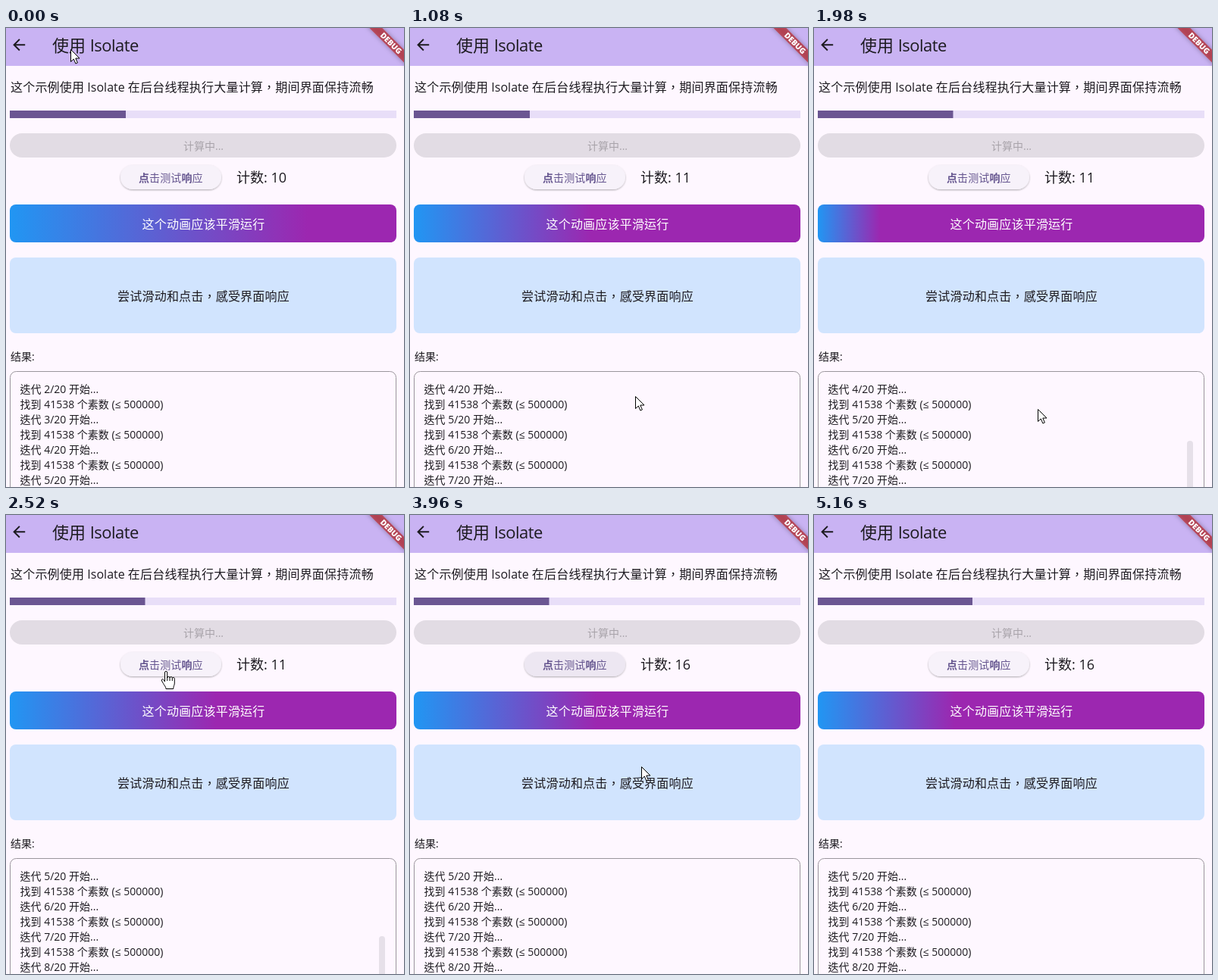
Write an HTML page that moves like this. It is 525 px wide and 606 px high and loops after 5280 ms.

```html
<!DOCTYPE html>
<html lang="zh-Hant">
<head>
<meta charset="utf-8">
<style>
  html, body { margin: 0; width: 100%; height: 100%; overflow: hidden; background: #fef7ff; }
  svg { display: block; width: 525px; height: 606px; }
  text { font: 14px 'Open Sans', 'Noto Sans CJK TC', 'Noto Sans CJK SC', sans-serif; fill: #1d1b20; white-space: pre; }
  .mid { text-anchor: middle; }
  .body { font-size: 16px; letter-spacing: .2px; }
  .plain { letter-spacing: 0; }
  .bold { font-weight: 700; }
</style>
</head>
<body>
<svg viewBox="0 0 525 606">
  <defs>
    <linearGradient id="sweep" gradientUnits="userSpaceOnUse" x1="5" x2="400" y1="0" y2="0">
      <stop stop-color="#2196f3"/>
      <stop offset="1" stop-color="#9c27b0"/>
    </linearGradient>
    <filter id="lift" x="-10%" y="-20%" width="120%" height="150%">
      <feDropShadow dx="0" dy="1" stdDeviation="0.8" flood-color="#000" flood-opacity=".32"/>
    </filter>
    <filter id="glow" x="-20%" y="-80%" width="140%" height="260%">
      <feDropShadow dx="0" dy="0" stdDeviation="3" flood-color="#000" flood-opacity=".5"/>
    </filter>
  </defs>

  <rect width="525" height="606" fill="#fef7ff"/>
  <rect width="525" height="50" fill="#c9b3f3"/>
  <path transform="translate(5.2 10.2)" fill="#1d1b20" d="M20 11H7.83l5.59-5.59L12 4l-8 8 8 8 1.41-1.41L7.83 13H20z"/>
  <text x="61" y="31" style="font-size:22px">使用 <tspan style="letter-spacing:-.55px">Isolate</tspan></text>

  <text class="body" x="6" y="84">这个示例使用<tspan class="plain"> Isolate </tspan>在后台线程执行大量计算，期间界面保持流畅</text>

  <rect x="5" y="109" width="510" height="10" fill="#e8def8"/>
  <rect id="progress" x="5" y="109" height="10" fill="#6b5692"/>

  <rect x="5" y="139" width="510" height="32" rx="16" fill="#e2dce4"/>
  <text class="mid" x="260.5" y="160.500" style="fill:#a8a3aa">计算中...</text>

  <rect id="button" x="151" y="181" width="133" height="32" rx="16" filter="url(#lift)"/>
  <text x="175" y="202.500" style="fill:#65558f;letter-spacing:.1px"><tspan class="bold">点</tspan>击测试<tspan class="bold">响</tspan>应</text>
  <text id="count" x="304" y="204" style="font-size:18px"></text>

  <rect x="5" y="233" width="510" height="50" rx="8" fill="url(#sweep)"/>
  <text class="body mid" x="260.5" y="265" style="fill:#fff">这个动画应该平滑运行</text>

  <rect x="5" y="303" width="510" height="100" rx="8" fill="#d1e4fe"/>
  <text class="body mid" x="260.5" y="360">尝试滑动和点击，感受界面响应</text>

  <text x="6" y="438.500">结果:</text>
  <rect x="5.500" y="453.500" width="509" height="200" rx="8" fill="none" stroke="#9a959c"/>
  <g id="log"></g>
  <rect id="scrollbar" x="492" width="8" height="100" rx="4" fill="#e6e0e9"/>

  <g transform="translate(532 -4) rotate(45)">
    <rect x="-40" y="28" width="80" height="12" fill="#b71c1c" fill-opacity=".63" filter="url(#glow)"/>
    <text class="mid" y="37.700" style="font-size:10.2px;font-weight:800;fill:#fff">DEBUG</text>
  </g>

  <g id="cursor" fill="#fff" stroke="#000" stroke-linejoin="round">
    <path id="arrow" d="M.5.5V16.500L4.300 13l2.600 6 2.500-1.100L6.800 12H12z"/>
    <path id="hand" d="M-1.500 14V2a1.600 1.600 0 013.200 0V9a1.600 1.600 0 013.300 0a1.600 1.600 0 013.300.7a1.500 1.500 0 013 .8V16c0 3-1.600 4-1.600 7.500H0c0-3-2-4-3.500-7L-5.500 13c-1-2 1-3 2.300-1.600zM1.700 8v5M5 9v4M8.300 10v3"/>
  </g>
</svg>
<script>
const LOOP = 5280, STEP = 60;
const el = id => document.getElementById(id);
const clamp = (v, lo = 0, hi = 1) => Math.min(hi, Math.max(lo, v));
const ramp = (t, from, to) => clamp((t - from) / (to - from));

// Pointer path: time, x, y
const path = [
  [0, 85, 28], [420, 265, 211], [600, 265, 211], [1020, 297, 486], [1140, 297, 486],
  [1560, 295, 503], [2220, 295, 503], [2520, 211, 206], [2700, 222, 173], [2760, 222, 173],
  [2880, 213, 188], [3480, 213, 188], [3960, 305, 332], [4020, 303, 380],
  [4140, 297, 410], [4740, 297, 410], [5100, 35, -10]
];

function pointerAt(t) {
  const i = path.findIndex(p => p[0] > t);
  if (i < 0) return path[path.length - 1].slice(1);
  const [a, b] = [path[i - 1], path[i]];
  const k = ramp(t, a[0], b[0]);
  return [1, 2].map(n => a[n] + (b[n] - a[n]) * k);
}

function sweepAt(t) {
  const period = 2900, zero = 1746;
  const phase = ((t - zero) % period + period) % period / period;
  return clamp(1 - Math.abs(2 * phase - 1), .002, .77);
}

function countAt(t) {
  if (t < 660) return 10;
  return 11 + clamp(Math.floor((t - 2760) / 120), 0, 5);
}

const lines = Array.from({ length: 7 }, (_, i) => {
  const line = document.createElementNS('http://www.w3.org/2000/svg', 'text');
  line.setAttribute('x', 18.5);
  line.setAttribute('y', 482 + 20 * i);
  return el('log').appendChild(line);
});

function setText(node, value) {
  if (node.textContent !== value) node.textContent = value;
}

function draw(t) {
  const done = t < 1920 ? .3 : t < 4320 ? .35 : .4;
  el('progress').setAttribute('width', 510 * done);
  el('sweep').setAttribute('x2', 5 + 510 * sweepAt(t));
  setText(el('count'), `计数: ${countAt(t)}`);

  const hover = ramp(t, 2580, 2880) * (1 - ramp(t, 3960, 4080));
  const mix = (a, b) => Math.round(a + (b - a) * hover);
  el('button').setAttribute('fill', `rgb(${mix(247, 237)},${mix(242, 231)},${mix(250, 242)})`);

  const first = t < 1020 ? 2 : t < 2280 ? 4 : 5;
  lines.forEach((line, i) => setText(line, i % 2
    ? '找到 41538 个素数 (≤ 500000)'
    : `迭代 ${first + i / 2}/20 开始...`));
  el('scrollbar').setAttribute('y', 545 + 11 * (first - 4));
  el('scrollbar').setAttribute('opacity', ramp(t, 1080, 1380) * (1 - ramp(t, 2520, 2700)));

  const [x, y] = pointerAt(t);
  const onButton = x > 151 && x < 284 && y > 172 && y < 221;
  el('cursor').setAttribute('transform', `translate(${Math.round(x)} ${Math.round(y)})`);
  el('cursor').setAttribute('display', t < 5160 ? 'inline' : 'none');
  el('arrow').setAttribute('display', onButton ? 'none' : 'inline');
  el('hand').setAttribute('display', onButton ? 'inline' : 'none');
}

const start = performance.now();
function tick() {
  const t = (performance.now() - start) % LOOP;
  draw(Math.floor(t / STEP) * STEP);
  requestAnimationFrame(tick);
}
tick();
</script>
</body>
</html>
```
